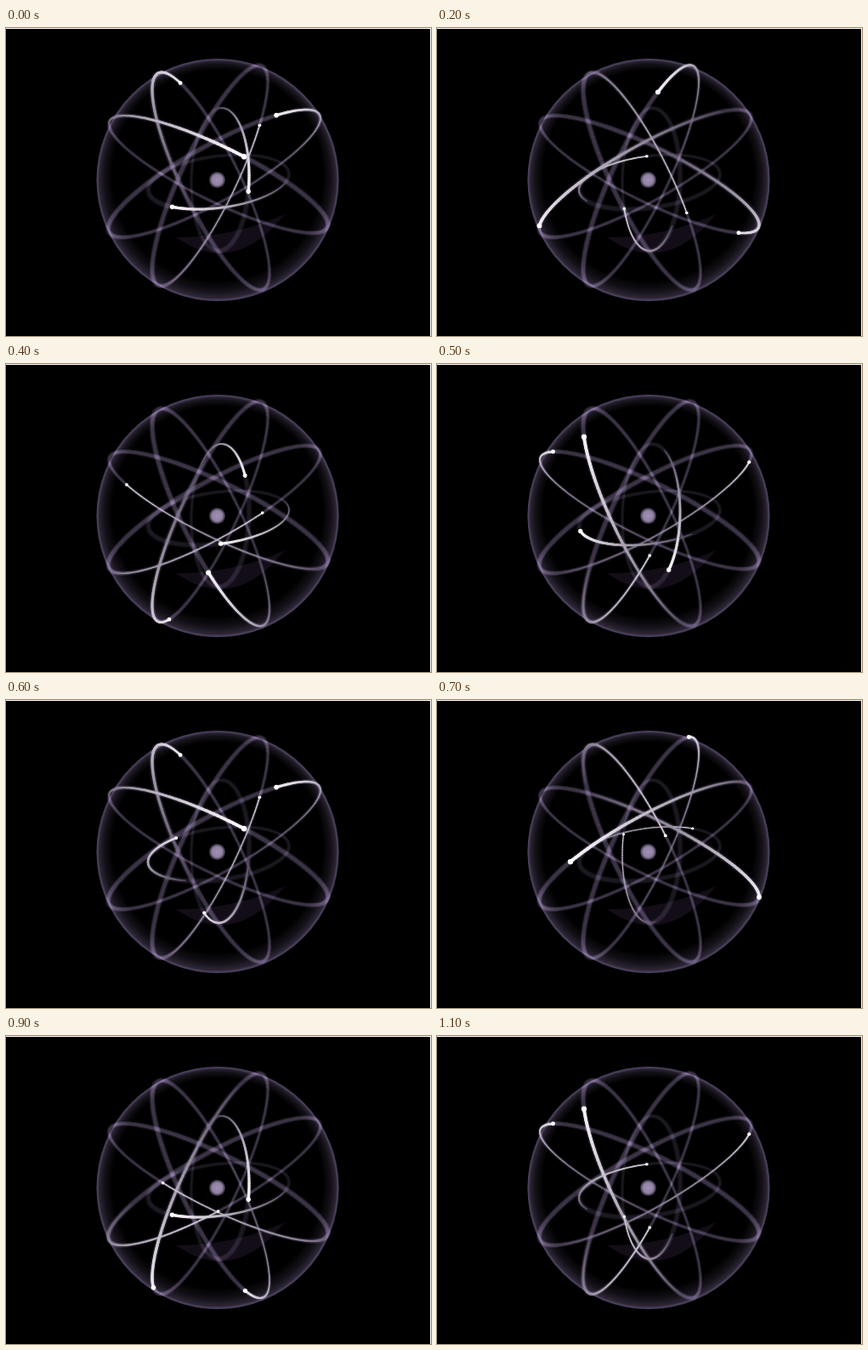
An HTML page with a canvas for the animation above (1200 ms loop, 500 by 362 pixels).

```html
<!DOCTYPE html>
<html lang="en">
<head>
<meta charset="utf-8">
<title>Atom</title>
<style>
  html, body { margin: 0; width: 100%; height: 100%; overflow: hidden; background: #000; }
  canvas { display: block; }
</style>
</head>
<body>
<canvas id="stage" width="500" height="362"></canvas>
<script>
const ctx = document.getElementById('stage').getContext('2d');
const STEP = 100, STEPS = 12;
const cosd = deg => Math.cos(deg * Math.PI / 180);

// Path: x = cx + ax cos(t), y = cy + ay cos(t - skew); near is the angle closest to the viewer.
// Motion: start is the mean angle at phase 0, swing and peak bend the steady turn.
const outer = [
  { cx: 241, cy: 180, ax: 69, ay: 128, skew: 33, near: 140, start: 162, swing: 12, peak: 45 },
  { cx: 240, cy: 173.5, ax: 68, ay: -130, skew: 32, near: 125, start: 276, swing: 15, peak: 280 },
  { cx: 245, cy: 171, ax: 125, ay: -75, skew: 30, near: 120, start: 1, swing: 15, peak: 210 },
  { cx: 250, cy: 172, ax: 129, ay: 69, skew: 31, near: 300, start: 220, swing: 12, peak: 165 }
];
const inner = [
  { cx: 252, cy: 178, ax: 34, ay: 84, skew: 93, near: 20, start: 5, swing: 8, peak: 20 },
  { cx: 250, cy: 181, ax: 83, ay: 32, skew: 107, near: 130, start: 119, swing: 12, peak: 0 }
];

// Outer electrons turn once in 5.5 steps and rest briefly at both ends of the loop.
const outerPhase = step => (Math.min(Math.max(step, 0.5), 10.5) - 5) * 360 / 5.5;
const innerPhase = step => step * 360 / 4.5;

const point = (o, t) => [o.cx + o.ax * cosd(t), o.cy + o.ay * cosd(t - o.skew)];
const depth = (o, t) => 0.5 + 0.5 * cosd(t - o.near);
const headAngle = (o, phase) => o.start + phase + o.swing * cosd(phase - o.peak);
const mix = (a, b, k) => 'rgb(' + a.map((v, i) => Math.round(v + (b[i] - v) * k)) + ')';

function segment(o, from, to, width, color) {
  ctx.beginPath();
  ctx.moveTo(...point(o, from));
  ctx.lineTo(...point(o, to));
  ctx.lineWidth = width;
  ctx.strokeStyle = color;
  ctx.stroke();
}

function disc(x, y, r, fill) {
  ctx.beginPath();
  ctx.arc(x, y, r, 0, 7);
  ctx.fillStyle = fill;
  ctx.fill();
}

function gradient(circles, stops) {
  const g = ctx.createRadialGradient(...circles);
  stops.forEach(([at, color]) => g.addColorStop(at, color));
  return g;
}

function sphere() {
  disc(249, 178.5, 142.5, gradient([249, 173, 124, 249, 178.5, 142.5], [
    [0, 'rgba(64,54,76,0)'], [0.5, 'rgba(64,54,76,0.3)'],
    [0.85, 'rgba(68,58,82,0.65)'], [1, 'rgba(76,65,92,0.85)']
  ]));
  ctx.beginPath();
  ctx.arc(249, 178.5, 141.3, 0, 7);
  ctx.lineWidth = 2.4;
  ctx.strokeStyle = 'rgba(86,75,104,0.5)';
  ctx.stroke();
}

function shade() {
  ctx.beginPath();
  ctx.moveTo(200, 246);
  ctx.quadraticCurveTo(268, 294, 328, 219);
  ctx.quadraticCurveTo(268, 246, 200, 246);
  ctx.fillStyle = 'rgb(18,13,22)';
  ctx.fill();
}

function track(o, level) {
  ctx.globalCompositeOperation = 'lighter';
  ctx.lineCap = 'butt';
  for (let t = 0; t < 360; t += 3) {
    const d = depth(o, t);
    segment(o, t, t + 3, 4 + 3 * d, `rgba(84,73,98,${0.36 * level})`);
    segment(o, t, t + 3, 2.2 + 2 * d, `rgba(84,73,98,${0.42 * level})`);
  }
  ctx.globalCompositeOperation = 'source-over';
}

function trail(o, head, length, scale) {
  const dim = [72, 62, 84], lit = [255, 252, 255];
  ctx.globalCompositeOperation = 'lighten';
  ctx.lineCap = 'round';
  for (let back = length; back > 0; back -= 2) {
    const k = 1 - back / length, t = head - back, d = depth(o, t);
    const width = (1.2 + 2.2 * d) * (0.75 + 0.4 * k) * scale;
    segment(o, t, t + 2, width, mix(dim, lit, Math.pow(k, 0.9) * (0.75 + 0.25 * d)));
  }
  disc(...point(o, head), (1.8 + 1.4 * depth(o, head)) * scale, '#fff');
  ctx.globalCompositeOperation = 'source-over';
}

function draw(step) {
  ctx.fillStyle = '#000';
  ctx.fillRect(0, 0, 500, 362);
  shade();
  sphere();
  inner.forEach(o => track(o, 0.4));
  outer.forEach(o => track(o, 0.9));
  disc(248.5, 178.5, 9.5, gradient([248.5, 178.5, 0, 248.5, 178.5, 9.5], [
    [0, 'rgb(160,144,178)'], [0.65, 'rgb(146,130,164)'], [1, 'rgba(88,76,104,0.6)']
  ]));
  inner.forEach(o => trail(o, headAngle(o, innerPhase(step)), 115, 0.85));
  outer.forEach(o => trail(o, headAngle(o, outerPhase(step)), 130, 1));
  // Thin white border along the top and right edges.
  ctx.fillStyle = '#fff';
  ctx.fillRect(0, 0, 500, 1);
  ctx.fillRect(499, 0, 1, 362);
}

let shown = -1;
function tick() {
  const step = Math.floor(performance.now() / STEP) % STEPS;
  if (step !== shown) draw(shown = step);
  requestAnimationFrame(tick);
}
tick();
</script>
</body>
</html>
```
